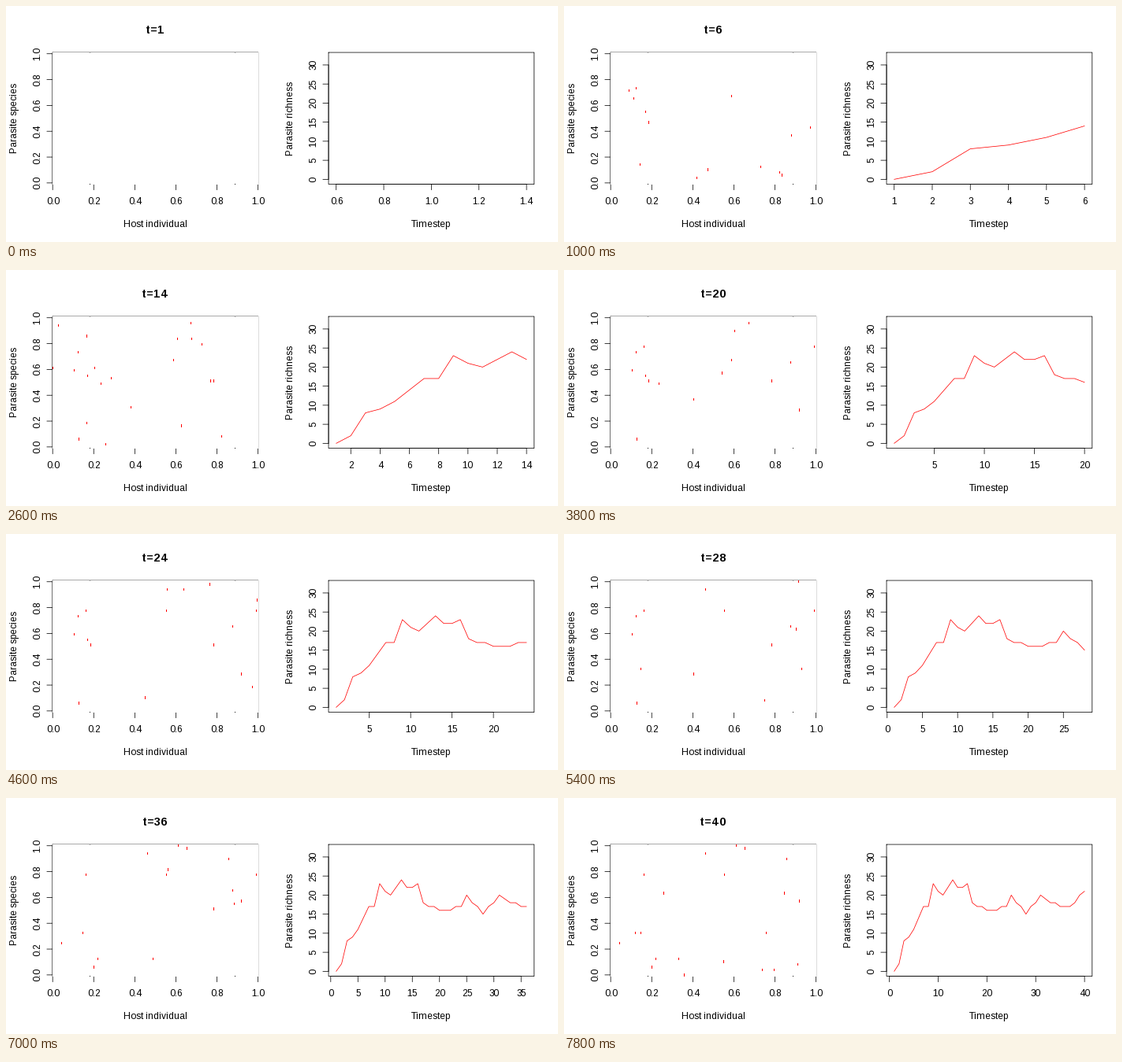
Animation of 700 by 300 pixels, one loop 8 s. Source, as a matplotlib script:

```python
import math
import random

import matplotlib.pyplot as plt
import numpy as np
from matplotlib.animation import FuncAnimation
from matplotlib.patches import Rectangle

W, H, DPI = 700, 300, 100
PX = 72 / DPI  # one pixel in points
LINE = 14.4  # height of one margin line
TOP, BOTTOM = 4.1 * LINE, H - 5.1 * LINE
LEFT_A, LEFT_B = 4.1 * LINE, W / 2 + 4.1 * LINE
PANEL_W = W / 2 - 6.2 * LINE
PANEL_H = BOTTOM - TOP
STEPS, SPECIES, Y_MAX = 40, 50, 32
ROW_H = PANEL_H / SPECIES
TICK = LINE / 2

plt.rcParams["font.family"] = "Liberation Sans"
plt.rcParams["text.hinting_factor"] = 1  # whole-pixel letter spacing

# turning points of the richness curve
TURN_T = [1, 2, 3, 5, 7, 8, 9, 11, 13, 14, 16, 17, 20, 24, 25, 28, 31, 35, 37, 40]
TURN_R = [0, 2, 8, 11, 17, 17, 23, 20, 24, 22, 23, 18, 16, 17, 20, 15, 20, 17, 17, 21]
STEP_NO = np.arange(1, STEPS + 1)
RICHNESS = np.floor(np.interp(STEP_NO, TURN_T, TURN_R) + 0.49).astype(int)


def simulate(loss=0.08):
    """Infected (column, species) cells at each step; their number is the richness."""
    rng = random.Random(7)
    alive, history = [], []
    for count in RICHNESS:
        alive = [cell for cell in alive if rng.random() > loss]
        while len(alive) > count:
            alive.pop(rng.randrange(len(alive)))
        while len(alive) < count:
            alive.append((rng.randint(59, 319), rng.randrange(SPECIES)))
        history.append(list(alive))
    return history


CELLS = simulate()

fig = plt.figure(figsize=(W / DPI, H / DPI), dpi=DPI, facecolor="white")
ax = fig.add_axes([0, 0, 1, 1])
ax.set_xlim(0, W)
ax.set_ylim(H, 0)
ax.axis("off")


def stroke(xs, ys, color="black"):
    line, = ax.plot(xs, ys, color=color, lw=0.75 * PX, snap=False, zorder=2,
                    solid_capstyle="round", solid_joinstyle="round")
    return line


def bar(x, y, w, h, color, z):
    return ax.add_patch(Rectangle((x, y), w, h, fc=color, lw=0,
                                  antialiased=False, zorder=z))


def label(x, y, s, rot=0, size=12, weight="normal"):
    return ax.text(x, y, s, fontsize=size * PX, rotation=rot, ha="center",
                   va="baseline", rotation_mode="anchor", weight=weight)


def x_axis(xs, names):
    parts = [stroke([xs[0], xs[-1]], [BOTTOM, BOTTOM])]
    for x, s in zip(xs, names):
        parts.append(stroke([x, x], [BOTTOM, BOTTOM + TICK]))
        parts.append(label(x, 252, s))
    return parts


def y_axis(left, ys, names):
    stroke([left, left], [ys[0], ys[-1]])
    for y, s in zip(ys, names):
        stroke([left - TICK, left], [y, y])
        label(left - 15.8, y, s, 90)


def frame(left, x_name, y_name):
    right = left + PANEL_W
    stroke([left, right, right, left, left], [TOP, TOP, BOTTOM, BOTTOM, TOP])
    label(left + PANEL_W / 2, 281, x_name)
    label(left - 44.6, (TOP + BOTTOM) / 2, y_name, 90)


def scale(v, lo, hi, start, length):
    """Map a value to pixels, with 4% padding at both ends."""
    pad = 0.04 * (hi - lo)
    return start + length * (v - lo + pad) / (hi - lo + 2 * pad)


def y_richness(v):
    return scale(v, 0, Y_MAX, BOTTOM, -PANEL_H)


def draw_static():
    frame(LEFT_A, "Host individual", "Parasite species")
    part = np.linspace(0, 1, 6)
    names = [f"{p:.1f}" for p in part]
    x_axis(LEFT_A + 0.13 + part * (PANEL_W - 0.26), names)
    y_axis(LEFT_A, BOTTOM - ROW_H * (0.5 + part * (SPECIES - 1)), names)
    # the white grid hides the inner half of the frame, except at two seams
    for x0, x1 in ((59, 106), (107, 290), (291, 320)):
        bar(x0, 59, x1 - x0, 168, "white", 3)

    frame(LEFT_B, "Timestep", "Parasite richness")
    counts = range(0, 31, 5)
    y_axis(LEFT_B, [y_richness(v) for v in counts], counts)


def nice_step(span):
    """Tick distance giving about five intervals."""
    cell = span / 5
    base = 10 ** math.floor(math.log10(cell))
    unit = base
    for mult, bias in ((2, 0.8), (5, 1.7), (10, 0.8)):
        if mult * base - cell >= bias * (cell - unit):
            break
        unit = mult * base
    return unit


def ticks(lo, hi):
    pad = 0.04 * (hi - lo)
    lo, hi = lo - pad, hi + pad
    unit = nice_step(hi - lo)
    first = math.ceil(lo / unit - 1e-7)
    last = math.floor(hi / unit + 1e-7)
    digits = 1 if unit < 0.99 else 0
    values = [k * unit for k in range(first, last + 1)]
    return values, [f"{v:.{digits}f}" for v in values]


draw_static()
title = label(LEFT_A + PANEL_W / 2, 35, "", size=14.4, weight="bold")
curve = stroke([], [], "red")
moving = []


def update(i):
    t = i + 1
    while moving:
        moving.pop().remove()
    title.set_text(f"t={t}")

    for col, row in CELLS[i]:
        y0 = round(BOTTOM - (row + 1) * ROW_H)
        y1 = round(BOTTOM - row * ROW_H)
        moving.append(bar(col, y0, 1, y1 - y0, "red", 4))

    lo, hi = (1, t) if t > 1 else (0.6, 1.4)
    values, names = ticks(lo, hi)
    moving.extend(x_axis([scale(v, lo, hi, LEFT_B, PANEL_W) for v in values], names))
    curve.set_data(scale(STEP_NO[:t], lo, hi, LEFT_B, PANEL_W),
                   y_richness(RICHNESS[:t]))
    return [title, curve, *moving]


anim = FuncAnimation(fig, update, frames=STEPS, interval=200, repeat=True,
                     repeat_delay=0, init_func=lambda: update(0), blit=False)
plt.show()
```
